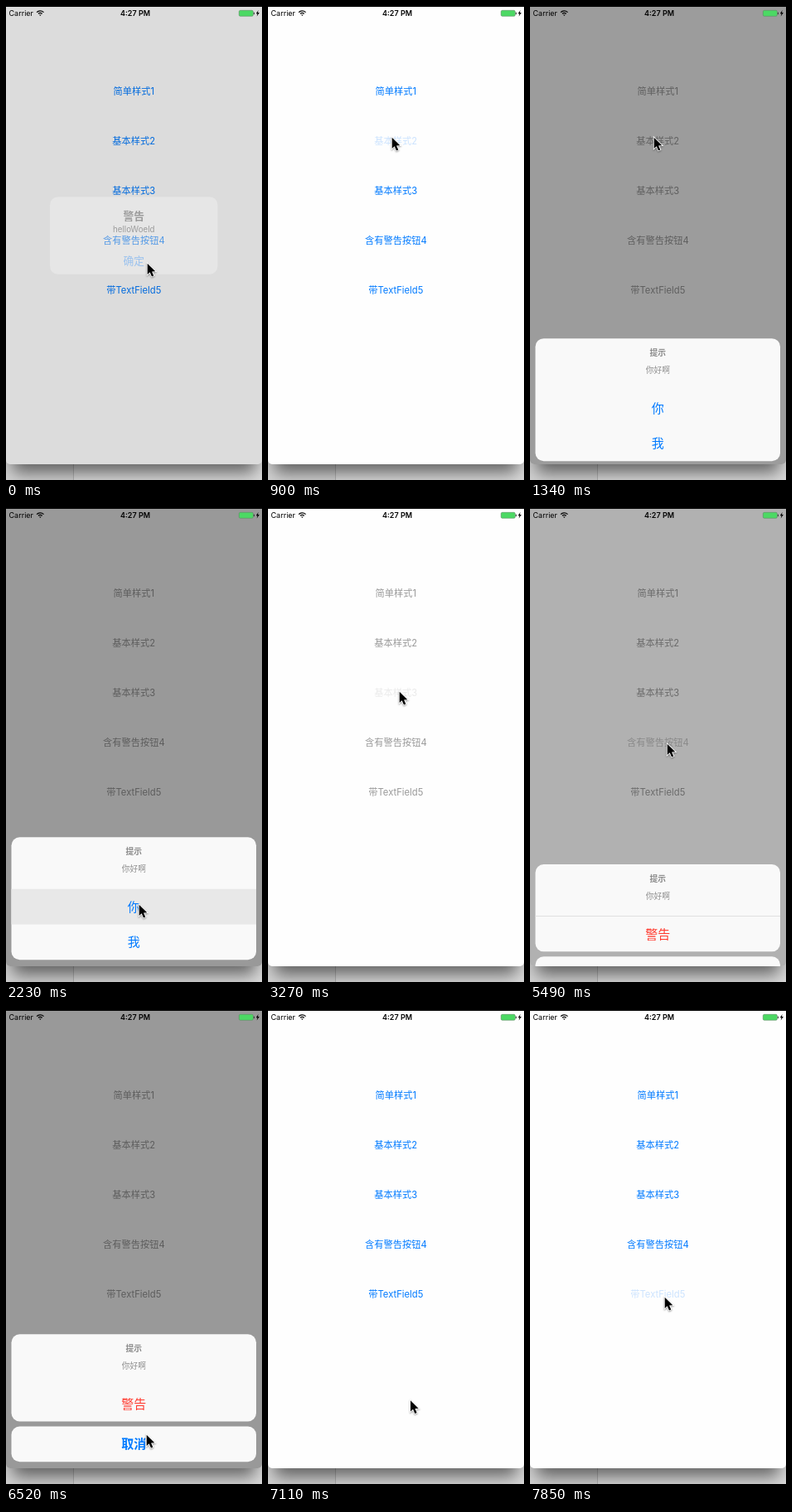
Write an HTML page with a canvas that moves like this. It is 309 by 572 pixels and loops after 8 s.

```html
<!DOCTYPE html>
<html lang="zh">
<head>
<meta charset="utf-8">
<style>
html, body { margin: 0; width: 100%; height: 100%; overflow: hidden; background: #dadada }
canvas { display: block; width: 309px; height: 572px }
</style>
</head>
<body>
<canvas></canvas>
<script>
const W = 309, H = 572, FLOOR = 553, MID = 154.3;
const LOOP = 8000, STEPS = 54;
const BLUE = '#007aff', RED = '#ff3b30', GRAY = '#999', CARD = '#f9f9f9';
const canvas = document.querySelector('canvas'), c = canvas.getContext('2d');
const dpr = window.devicePixelRatio || 1;
canvas.width = W * dpr;
canvas.height = H * dpr;

const labels = ['简单样式1', '基本样式2', '基本样式3', '含有警告按钮4', '带TextField5'];
const pressedAt = [-99, 6, 21, 35, 53];
const tinted = [[7, 15], [22, 31], [36, 44]];

// show: [step, visibility]; lit: [row, first step, last step]
const dialogs = [
  { kind: 'alert', title: '警告', note: 'helloWoeld', rows: ['确定'], show: [[0, .33], [1, 0]] },
  { kind: 'sheet', title: '提示', note: '你好啊', rows: ['你', '我'], lit: [0, 15, 16],
    show: [[6, 0], [7, .15], [8, .76], [9, .975], [10, 1], [15, 1], [16, .75], [17, .2], [18, 0]] },
  { kind: 'alert', title: '提示', note: '你好啊', rows: ['不做处理', '我', '他'], lit: [0, 31, 33], grow: 25,
    show: [[22, 0], [23, .4], [24, .9], [25, 1], [31, 1], [32, .67], [33, .2], [34, 0]] },
  { kind: 'sheet', title: '提示', note: '你好啊', rows: ['警告'], color: RED, cancel: '取消', lit: [1, 43, 43], rule: 42,
    show: [[35, 0], [36, .15], [37, .76], [38, .975], [39, 1], [44, 1], [45, .75], [46, .2], [47, 0]] }
];

const pointer = [[2, 170, 310], [4, 149, 158], [10, 149, 158], [13, 160, 478], [18, 160, 478],
  [20, 158, 221], [25, 158, 221], [30, 188, 277], [32, 188, 277], [34, 165, 284],
  [38, 165, 284], [41, 169, 512], [47, 169, 512], [50, 178, 352], [52, 162, 346]];

const smooth = u => u * u * (3 - 2 * u);

function tween(keys, k, col = 1, ease = u => u) {
  if (k <= keys[0][0]) return keys[0][col];
  for (let i = 1; i < keys.length; i++) {
    const a = keys[i - 1], b = keys[i];
    if (k <= b[0]) return a[col] + (b[col] - a[col]) * ease((k - a[0]) / (b[0] - a[0]));
  }
  return keys[keys.length - 1][col];
}

function text(s, x, y, size, color, weight = 400, align = 'center') {
  c.font = `${weight} ${size}px Inter, "Noto Sans CJK SC", "Noto Sans CJK", sans-serif`;
  c.textAlign = align;
  c.fillStyle = color;
  c.fillText(s, x, y + size * .37);
}

function box(x, y, w, h, r, color) {
  c.beginPath();
  c.roundRect(x, y, w, h, r);
  c.fillStyle = color;
  c.fill();
}

function poly(points, color) {
  c.beginPath();
  points.forEach(([x, y]) => c.lineTo(x, y));
  c.closePath();
  c.fillStyle = color;
  c.fill();
}

function desktop() {
  c.fillStyle = '#dadada';
  c.fillRect(0, 0, W, H);
  c.fillStyle = '#d2d2d2';
  c.fillRect(0, 540, 81, 32);
  c.fillStyle = '#b4b4b4';
  c.fillRect(81, 540, 1, 32);
  c.save();
  c.shadowColor = 'rgba(0,0,0,.55)';
  c.shadowBlur = 20 * dpr;
  c.shadowOffsetY = 10 * dpr;
  box(8, 20, W - 16, FLOOR - 20, 5, '#fff');
  c.restore();
}

function statusBar() {
  text('Carrier', 3.5, 8.7, 9, '#000', 400, 'left');
  text('4:27 PM', 156, 8.7, 9, '#000', 600);
  c.strokeStyle = '#000';
  c.lineWidth = 1.3;
  for (const r of [3.2, 5.8]) {
    c.beginPath();
    c.arc(41.3, 11.6, r, -Math.PI * .76, -Math.PI * .24);
    c.stroke();
  }
  poly([[41.3, 12], [39.9, 10.5], [42.7, 10.5]], '#000');
  c.beginPath();
  c.roundRect(281.3, 5.3, 17, 7, 1.5);
  c.fillStyle = '#4cd964';
  c.fill();
  c.strokeStyle = '#5a8a62';
  c.lineWidth = .6;
  c.stroke();
  box(298.9, 7.4, 1, 2.8, .5, '#333');
  poly([[304.6, 5], [301.8, 9.3], [303.5, 9.3], [302.7, 12.5], [305.9, 8], [304, 8]], '#000');
}

function alertBox(d, k, p) {
  const h = 60.5 + d.rows.length * 33.2, x = 53, w = 202.5, top = 277 - h / 2;
  c.save();
  c.globalAlpha = p;
  if (k < d.grow) {
    const s = 1 + .15 * (1 - p);
    c.translate(MID, 277);
    c.scale(s, s);
    c.translate(-MID, -277);
  }
  box(x, top, w, h, 10, CARD);
  text(d.title, MID, top + 23, 12.75, '#000', 600);
  text(d.note, MID, top + 39, 9.75, '#000');
  d.rows.forEach((row, i) => {
    const y = top + 60.5 + i * 33.2;
    if (d.lit && d.lit[0] === i && k >= d.lit[1] && k <= d.lit[2]) box(x, y, w, 33.2, 0, '#e8e8e8');
    text(row, MID, y + 16.6, 12.75, BLUE);
  });
  c.restore();
}

function sheet(d, k, p) {
  const row = 42.75, h = 62.5 + d.rows.length * row, x = 6.5, w = 295.5;
  const rest = 545.3 - h - (d.cancel ? row + 6 : 0);
  const top = rest + (1 - p) * (FLOOR - rest);
  const lit = i => d.lit[0] === i && k >= d.lit[1] && k <= d.lit[2];
  box(x, top, w, h, 10, CARD);
  text(d.title, MID, top + 17, 9.75, '#8a8a8a', 600);
  text(d.note, MID, top + 38, 9.75, '#8f8f8f');
  d.rows.forEach((s, i) => {
    const y = top + 62.5 + i * row;
    if (lit(i)) box(x, y, w, row, i === d.rows.length - 1 ? [0, 0, 10, 10] : 0, '#e8e8e8');
    text(s, MID, y + row / 2, 15, d.color || BLUE);
  });
  if (k <= d.rule) box(x, top + 62, w, .8, 0, '#e0e0e0');
  if (d.cancel) {
    const y = top + h + 6;
    box(x, y, w, row, 10, lit(d.rows.length) ? '#e8e8e8' : CARD);
    text(d.cancel, MID, y + row / 2, 15, BLUE, 600);
  }
}

function arrow(x, y) {
  c.save();
  c.translate(x, y);
  c.beginPath();
  [[.7, .8], [.7, 14], [3.7, 11.2], [6, 16.4], [8.3, 15.4], [6.1, 10.4], [10.3, 10.2]]
    .forEach(([a, b]) => c.lineTo(a, b));
  c.closePath();
  c.shadowColor = 'rgba(0,0,0,.4)';
  c.shadowBlur = 2 * dpr;
  c.shadowOffsetY = dpr;
  c.strokeStyle = '#fff';
  c.lineWidth = 1.8;
  c.stroke();
  c.shadowColor = 'transparent';
  c.fillStyle = '#000';
  c.fill();
  c.restore();
}

function draw(k) {
  c.setTransform(dpr, 0, 0, dpr, 0, 0);
  desktop();
  c.save();
  c.beginPath();
  c.roundRect(0, 0, W, FLOOR, [0, 0, 5, 5]);
  c.clip();
  c.fillStyle = '#fefefe';
  c.fillRect(0, 0, W, FLOOR);

  const tint = tinted.some(([a, b]) => k >= a && k <= b) ? GRAY : BLUE;
  labels.forEach((s, i) => {
    const since = k - pressedAt[i];
    c.globalAlpha = since < 0 ? 1 : tween([[1, .2], [2, .56], [3, .95], [4, 1]], since);
    text(s, MID, 102.5 + 60 * i, 11.25, tint);
  });
  c.globalAlpha = 1;

  for (const d of dialogs) {
    const p = tween(d.show, k);
    if (!p) continue;
    c.fillStyle = `rgba(0,0,0,${.4 * p})`;
    c.fillRect(0, 0, W, FLOOR);
    (d.kind === 'alert' ? alertBox : sheet)(d, k, p);
  }
  statusBar();
  c.restore();
  c.fillStyle = '#000';
  c.fillRect(0, 0, W, 1);
  arrow(tween(pointer, k, 1, smooth), tween(pointer, k, 2, smooth));
}

// The screen refreshes in 54 even steps per loop.
function tick() {
  const t = performance.now() % LOOP;
  draw(Math.floor((t + 5) / LOOP * STEPS) % STEPS);
  requestAnimationFrame(tick);
}
tick();
</script>
</body>
</html>
```
